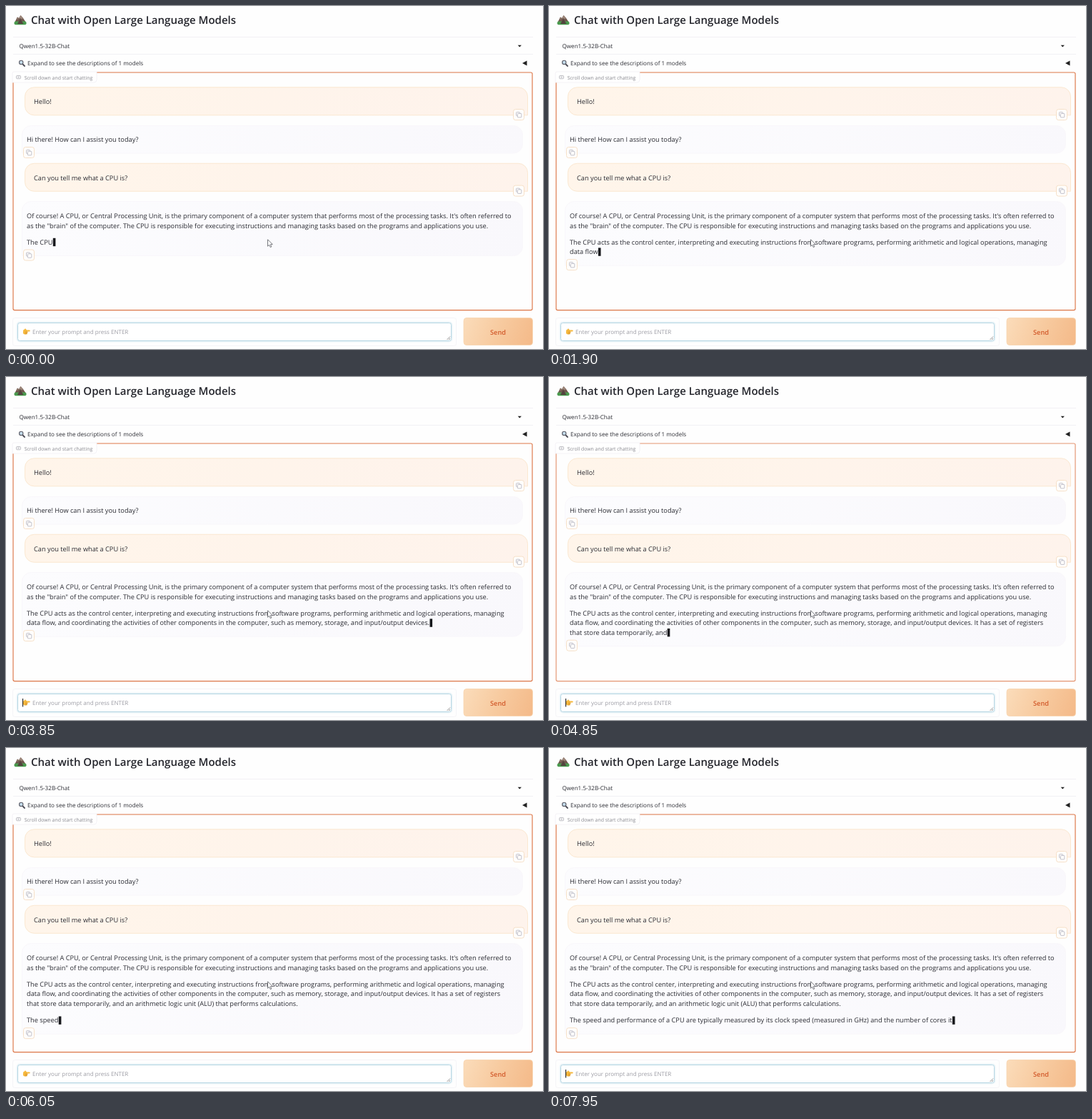
Write an HTML page with a canvas that moves like this. It is 752 px wide and 480 px high and loops after 8000 ms.

```html
<!DOCTYPE html>
<html lang="en">
<head>
<meta charset="utf-8">
<title>Chat</title>
<style>
  html, body { margin: 0; width: 100%; height: 100%; overflow: hidden; background: #fefefe; }
  canvas { display: block; width: 752px; height: 480px; }
</style>
</head>
<body>
<canvas id="stage"></canvas>
<script>
const W = 752, H = 480, LOOP = 8000;
const canvas = document.getElementById('stage');
const ctx = canvas.getContext('2d');
const dpr = window.devicePixelRatio || 1;
canvas.width = W * dpr;
canvas.height = H * dpr;
ctx.scale(dpr, dpr);
ctx.textRendering = 'geometricPrecision';

const BODY = 9.225, SMALL = 8.1;
const INK = '#2b2c33';

// The streamed reply; an empty token opens the last paragraph.
const reply = [
  { y: 333.6, text: 'The CPU acts as the control center, interpreting and executing instructions from software programs, performing arithmetic and logical operations, managing' },
  { y: 347.2, text: 'data flow, and coordinating the activities of other components in the computer, such as memory, storage, and input/output devices. It has a set of registers' },
  { y: 360.8, text: 'that store data temporarily, and an arithmetic logic unit (ALU) that performs calculations.' },
  { y: 384.3, text: 'The speed and performance of a CPU are typically measured by its clock speed (measured in GHz) and the number of cores it', opens: true }
];
for (const line of reply) {
  line.tokens = line.text.match(/\s*(?:[A-Za-z]+|[^\sA-Za-z])/g);
  if (line.opens) line.tokens.unshift('');
}
const TOKENS_AT_START = 2, TOKENS_PER_MS = 0.0121, TOKEN_PHASE = 0.45;

function setFont(size, weight = 400) {
  ctx.font = `${weight} ${size}px "Open Sans", "Noto Sans", sans-serif`;
}

function text(str, x, y, size = BODY, color = INK, weight = 400) {
  setFont(size, weight);
  ctx.fillStyle = color;
  ctx.fillText(str, x, y);
}

function paint(fill, edge, line) {
  if (fill) { ctx.fillStyle = fill; ctx.fill(); }
  if (edge) { ctx.strokeStyle = edge; ctx.lineWidth = line; ctx.stroke(); }
}

function box(x, y, w, h, r, fill, edge, line = 1) {
  ctx.beginPath();
  ctx.roundRect(x, y, w, h, r);
  paint(fill, edge, line);
}

function poly(points, fill, edge, line = 1) {
  ctx.beginPath();
  points.forEach(([x, y]) => ctx.lineTo(x, y));
  ctx.closePath();
  paint(fill, edge, line);
}

function stroke(points, color, line) {
  ctx.beginPath();
  points.forEach(([x, y]) => ctx.lineTo(x, y));
  paint(null, color, line);
}

function blend(x0, y0, x1, y1, ...colors) {
  const g = ctx.createLinearGradient(x0, y0, x1, y1);
  colors.forEach((c, i) => g.addColorStop(i / (colors.length - 1), c));
  return g;
}

function copyButton(cx, cy) {
  box(cx - 7.5, cy - 7.5, 15, 15, 3, '#fffdfb', '#f6e0c8');
  box(cx - 3.5, cy - 3.5, 5, 5, 0.8, null, '#b3b4c2', 0.8);
  box(cx - 1.7, cy - 1.7, 5.5, 5.5, 0.8, '#fffdfb', '#b3b4c2', 0.8);
}

function userBubble(y, str) {
  box(26.5, y, 704, 39, [13, 13, 0, 13], blend(26, y, 731, y + 39, '#fff5ea', '#fef3ec'), '#fbe8d1');
  text(str, 39, y + 23.2);
  copyButton(718, y + 38.3);
}

function botBubble(y, bottom) {
  box(22.5, y, 701, bottom - y, [13, 13, 13, 0], blend(22, y, 724, bottom, '#fcfcfe', '#f9f8fc'), '#f9f7fb');
  copyButton(32, bottom - 1);
}

function mountain() {
  poly([[12, 23], [16, 15.5], [18, 17], [20.5, 13], [24, 17], [28, 23], [28, 24], [12, 24]], '#6f574d');
  poly([[16, 15.5], [18, 17.5], [16.5, 19.5], [14.5, 18]], '#8b7468');
  poly([[20.5, 13], [24, 17], [22, 18.5], [20.5, 17], [18.8, 18], [18.3, 16.6]], '#9d877b');
  box(11.5, 21.5, 17, 4.7, 2, '#4a9a4e');
  poly([[20, 18], [24.5, 25], [16, 25]], '#54433f');
}

function magnifier() {
  ctx.lineCap = 'round';
  stroke([[23, 81], [26, 84]], '#4b4b55', 1.8);
  ctx.lineCap = 'butt';
  ctx.beginPath();
  ctx.arc(21.2, 78.9, 2.7, 0, 7);
  paint('#c4dceb', '#5d5f69', 1.1);
}

function finger() {
  box(24, 452.6, 5.5, 6.9, 2.2, '#f5b83d');
  box(27.5, 453.5, 6.2, 2.1, 1, '#f5b83d');
  box(27, 455.8, 3.6, 1.5, 0.7, '#e09a2b');
  box(26.6, 457.7, 3.3, 1.5, 0.7, '#e09a2b');
  box(26, 451.4, 2, 3, 1, '#f5b83d');
}

function header() {
  mountain();
  text('Chat with Open Large Language Models', 35, 24.6, 15.02, '#24252c', 600);
  stroke([[10, 43.5], [738, 43.5]], '#f2f1f5', 1);
  stroke([[10, 67.5], [738, 67.5]], '#f2f1f5', 1);
  text('Qwen1.5-32B-Chat', 18.5, 59.1, SMALL);
  poly([[716.7, 54.8], [721.9, 54.8], [719.3, 57.6]], '#222');
  magnifier();
  text('Expand to see the descriptions of 1 models', 30, 83, SMALL);
  poly([[723, 80], [729.5, 76.6], [729.5, 83.4]], '#222');
}

function chatLabel() {
  box(9, 92, 118, 15, [2, 0, 4, 0], '#fff', '#f1eff4', 0.8);
  box(14.5, 97.5, 6, 4.2, 1, null, '#a5a5ad', 0.8);
  stroke([[16, 99.6], [19, 99.6]], '#a5a5ad', 0.8);
  text('Scroll down and start chatting', 25.8, 102.6, 6.9, '#85858c');
}

function footer(t) {
  box(9.5, 436.5, 621, 39, 3, '#fefefe', '#f5f4f7');
  box(15.5, 442.5, 609, 27, 4, null, '#eaf4f8', 2);
  box(16.5, 443.5, 607, 25, 3, '#fff', '#b4d5e2');
  finger();
  text('Enter your prompt and press ENTER', 37, 458.5, 8.02, '#9d9da5');
  stroke([[617.5, 467], [622, 462.5]], '#777', 0.8);
  stroke([[620, 467], [622, 465]], '#777', 0.8);

  const caretOn = (t - 210 + 1060) % 1060 < 530;
  if (caretOn) {
    ctx.fillStyle = '#222';
    ctx.fillRect(23, 450, 1.1, 11.5);
  }

  box(641, 436.5, 96.5, 38, 4, blend(641, 437, 738, 475, '#fbdcba', '#f7ca9f', '#f4b988'), '#f8d3ae', 0.8);
  text('Send', 678, 459.8, BODY, '#d2592a', 600);
}

function streamed(t) {
  let left = TOKENS_AT_START + Math.floor(t * TOKENS_PER_MS + TOKEN_PHASE);
  const shown = [];
  for (const line of reply) {
    if (left <= 0) break;
    shown.push({ y: line.y, str: line.tokens.slice(0, left).join('') });
    left -= line.tokens.length;
  }
  return shown;
}

function answer(t) {
  const shown = streamed(t);
  const last = shown[shown.length - 1];
  botBubble(273.5, last.y + 15.9);
  text("Of course! A CPU, or Central Processing Unit, is the primary component of a computer system that performs most of the processing tasks. It's often referred to", 29, 296.7);
  text('as the "brain" of the computer. The CPU is responsible for executing instructions and managing tasks based on the programs and applications you use.', 29, 310.5);
  shown.forEach(({ y, str }) => text(str, 29, y));
  const end = 29 + ctx.measureText(last.str).width;
  ctx.fillStyle = '#17181c';
  ctx.fillRect(end + 0.4, last.y - 8.8, 3.6, 11.4);
}

// Border opacity dips at the middle of each two-second pulse.
function chatBorder(t) {
  const dip = (1 - Math.cos(t / 2000 * 2 * Math.PI)) / 2;
  ctx.globalAlpha = 1 - 0.25 * dip;
  box(10, 93, 727, 332.6, 2, null, '#dc7546', 1.15);
  ctx.globalAlpha = 1;
}

function pointer() {
  poly([[366.5, 326.8], [366.5, 336.2], [368.7, 334.3], [370.2, 337.6], [371.8, 336.9],
        [370.4, 333.7], [373.2, 333.5]], '#fff', '#55565e', 0.8);
}

function draw(t) {
  ctx.fillStyle = '#fefefe';
  ctx.fillRect(0, 0, W, H);
  header();
  userBubble(113.8, 'Hello!');
  botBubble(167.5, 206);
  text('Hi there! How can I assist you today?', 29, 190.3);
  userBubble(220.3, 'Can you tell me what a CPU is?');
  answer(t);
  chatBorder(t);
  chatLabel();
  footer(t);
  pointer();
}

const start = performance.now();
function frame() {
  draw((performance.now() - start) % LOOP);
  requestAnimationFrame(frame);
}
frame();
</script>
</body>
</html>
```
